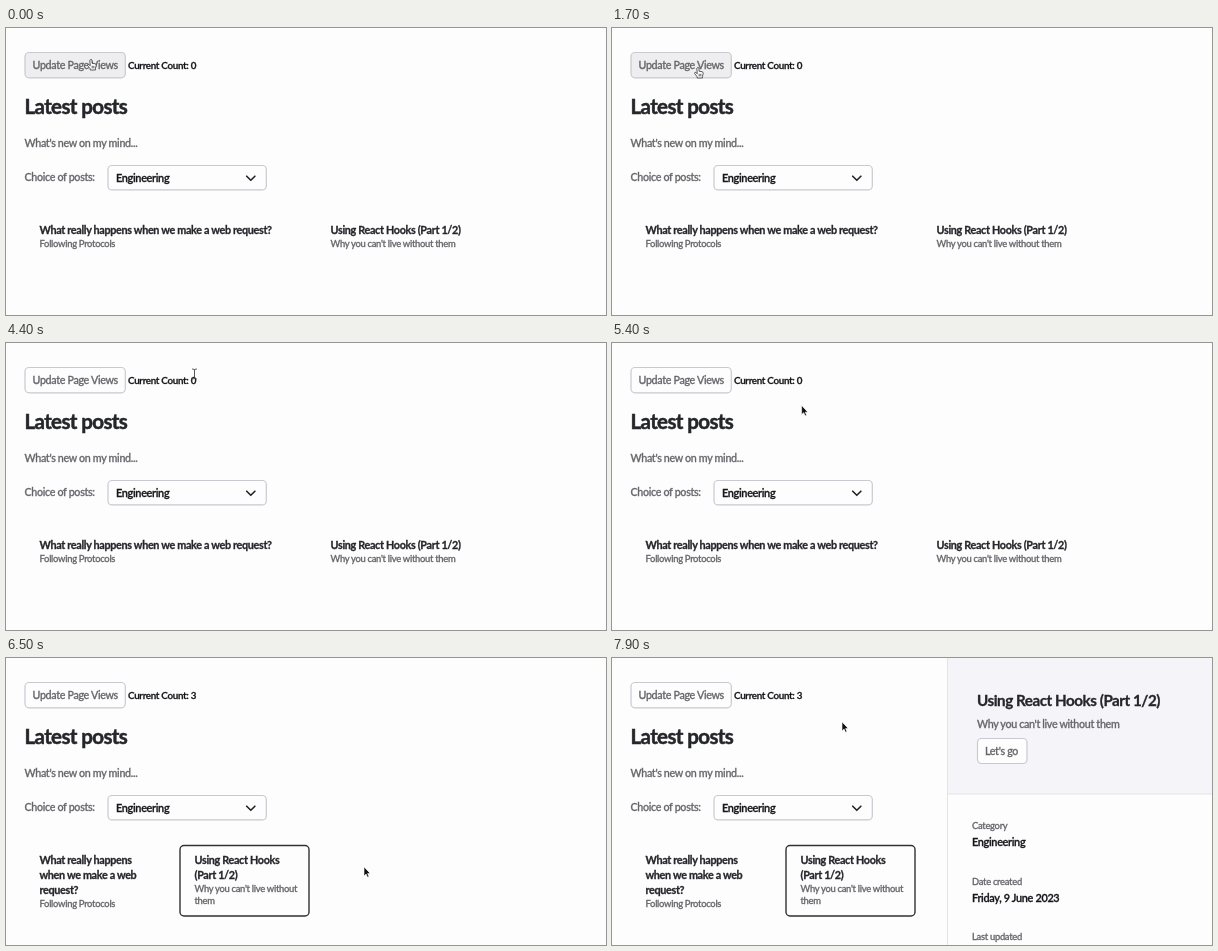
Animation, 600 px wide and 287 px high, one loop 8 s. Source, as an HTML page:

```html
<!DOCTYPE html>
<html lang="en">
<head>
<meta charset="utf-8">
<title>Latest posts</title>
<style>
  html, body { margin: 0; width: 100%; height: 100%; overflow: hidden; background: #fefdfe; }
  svg { display: block; width: 100%; height: 100%; }
  text { font: 500 10.7px Lato, "Open Sans", sans-serif; letter-spacing: -.03em; fill: #66666a; stroke: #66666a; stroke-width: .3; }
  .bold { font-weight: 700; font-size: 10.8px; fill: #25262a; stroke: #25262a; }
  .dark { font-weight: 600; font-size: 10.9px; fill: #16171a; stroke: #16171a; }
  .small { font-size: 9.4px; }
  .count { font-size: 9.8px; }
  .heading { font-size: 20.5px; stroke-width: .5; }
  .title { font-size: 15.2px; }
  .box { fill: #fefdfe; stroke: #c9c9d1; stroke-width: 1.2; }
</style>
</head>
<body>
<svg viewBox="0 0 600 287">
  <rect id="button" class="box" x="19" y="24.5" width="100.3" height="25.3" rx="4"/>
  <text x="26.5" y="41">Update Page Views</text>
  <text id="count" class="dark count" x="122" y="41"></text>
  <text class="bold heading" x="18.5" y="86">Latest posts</text>
  <text x="18.5" y="118.5">What's new on my mind...</text>
  <text x="18.5" y="153.3">Choice of posts:</text>
  <rect class="box" x="102" y="137.5" width="158.3" height="24.4" rx="4"/>
  <text class="dark" x="110" y="154">Engineering</text>
  <path d="M240.7 148.2l4.1 4.1 4.1-4.1" fill="none" stroke="#202125" stroke-width="1.6" stroke-linecap="round" stroke-linejoin="round"/>

  <g id="wide">
    <rect id="hover" x="310" y="187" width="266.5" height="42" rx="4"/>
    <text class="bold" x="33.5" y="205.7">What really happens when we make a web request?</text>
    <text class="small" x="33.5" y="218.6">Following Protocols</text>
    <text class="bold" x="324.5" y="205.7">Using React Hooks (Part 1/2)</text>
    <text class="small" x="324.5" y="218.6">Why you can't live without them</text>
  </g>

  <g id="narrow">
    <rect x="174" y="187.5" width="129" height="70.5" rx="4" fill="#fefdfe" stroke="#303136" stroke-width="1.4"/>
    <text class="bold" x="33.5" y="205.7">What really happens</text>
    <text class="bold" x="33.5" y="220.7">when we make a web</text>
    <text class="bold" x="33.5" y="235.7">request?</text>
    <text class="small" x="33.5" y="248.6">Following Protocols</text>
    <text class="bold" x="188.5" y="205.7">Using React Hooks</text>
    <text class="bold" x="188.5" y="220.7">(Part 1/2)</text>
    <text class="small" x="188.5" y="233.6">Why you can't live without</text>
    <text class="small" x="188.5" y="245.6">them</text>
  </g>

  <g id="panel">
    <rect x="335" width="265" height="287" fill="#fefdfe"/>
    <rect x="335" width="265" height="136" fill="#f5f4f8"/>
    <path d="M335.5 0V287M335 136H600" fill="none" stroke="#e3e3e8"/>
    <text class="bold title" x="365" y="48">Using React Hooks (Part 1/2)</text>
    <text x="365" y="70">Why you can't live without them</text>
    <rect class="box" x="365.5" y="80.5" width="49.5" height="25" rx="4"/>
    <text x="373" y="97">Let's go</text>
    <text class="small" x="360" y="171">Category</text>
    <text class="dark" x="360" y="188">Engineering</text>
    <text class="small" x="360" y="226.5">Date created</text>
    <text class="dark" x="360" y="243.7">Friday, 9 June 2023</text>
    <text class="small" x="360" y="282">Last updated</text>
  </g>

  <g id="cursor" stroke-linejoin="round" stroke-linecap="round">
    <path id="arrow" d="M0 0V9l2.1-1.9 1.4 3.2 1.5-.7-1.4-3H6.1Z" fill="#111" stroke="#fff" stroke-width=".6"/>
    <path id="hand" d="M-1 1Q0-.4 1 1V4.2L4 4.7Q5.4 5 5.2 6.6L4.4 9.5V11H-.8V9.8L-3.4 6.5Q-3.4 5-2.2 5.4L-1 6.5ZM1.2 7.2V9M2.8 7.2V9" fill="#fff" stroke="#333" stroke-width=".8"/>
    <path id="beam" d="M-2-5Q0-5 0-4Q0-5 2-5M0-4V4M-2 5Q0 5 0 4Q0 5 2 5" fill="none" stroke="#444" stroke-width=".9"/>
  </g>
</svg>
<script>
  const LOOP = 8000, STEP = 100;
  const $ = id => document.getElementById(id);
  const show = (id, on) => $(id).setAttribute("visibility", on ? "visible" : "hidden");

  // Pointer stops: time, x, y
  const stops = [
    [0, 85, 31], [500, 86, 39], [3100, 86, 39], [3400, 104, 42], [3600, 150, 46],
    [3800, 205, 48], [4000, 212, 42], [4200, 203, 25], [4400, 188.5, 31],
    [4600, 180, 27], [4900, 164, 40], [5200, 166, 41], [5300, 166, 41],
    [5700, 317, 179], [5800, 317, 179], [6100, 358, 209],
    [7700, 358, 209], [7900, 230, 64], [8000, 230, 64]
  ];

  function pointerAt(t) {
    const i = stops.findIndex(s => s[0] > t);
    const [t0, x0, y0] = stops[i - 1], [t1, x1, y1] = stops[i];
    const k = (t - t0) / (t1 - t0), e = k * k * (3 - 2 * k);
    return [x0 + (x1 - x0) * e, y0 + (y1 - y0) * e];
  }

  const inside = ([x, y], left, top, right, bottom) =>
    x >= left && x <= right && y >= top && y <= bottom;

  function draw(now) {
    const t = Math.floor(now % LOOP / STEP) * STEP;
    const pos = pointerAt(t);
    const opened = t >= 6400;
    const overButton = inside(pos, 19, 24, 119, 50);
    const overCard = !opened && inside(pos, 310, 187, 576, 229);
    const overText = inside(pos, 120, 26, 194, 46);
    const pressed = [900, 1600, 2500].includes(t);

    $("button").style.fill = pressed ? "#dedee1" : overButton ? "#eeeef0" : "#fefdfe";
    $("count").textContent = "Current Count: " + (opened ? 3 : 0);
    $("hover").setAttribute("fill", t === 6300 ? "#e4e4e7" : "#eeeef0");
    show("hover", overCard);
    show("wide", !opened);
    show("narrow", opened);
    $("panel").setAttribute("opacity", t < 6600 ? 0 : t < 6700 ? 0.5 : 1);

    const shape = overButton || overCard ? "hand" : overText ? "beam" : "arrow";
    for (const id of ["arrow", "hand", "beam"]) show(id, id === shape);
    $("cursor").setAttribute("transform", `translate(${pos})`);
  }

  const start = performance.now();
  function tick() {
    draw(performance.now() - start);
    requestAnimationFrame(tick);
  }
  tick();
</script>
</body>
</html>
```
